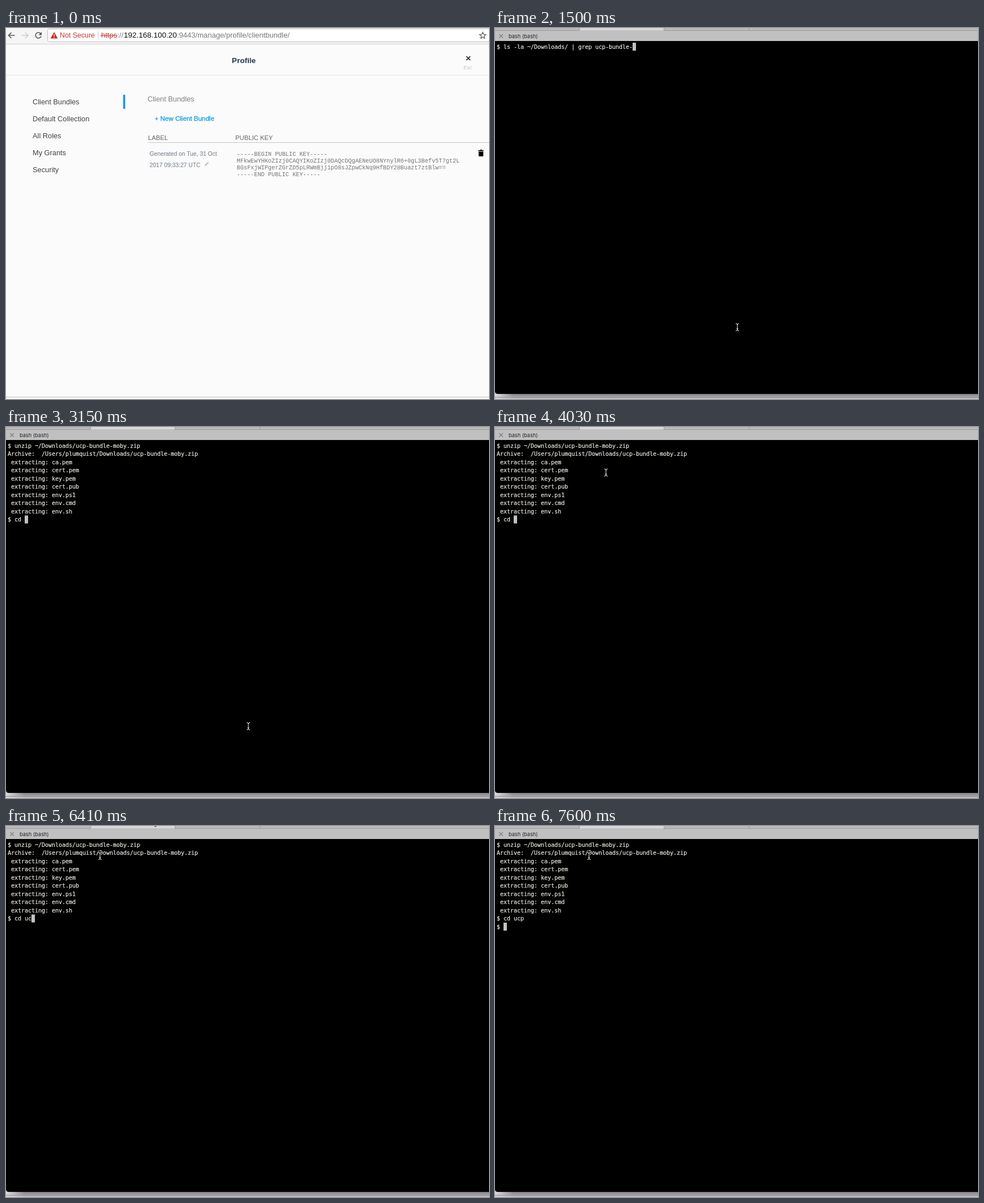
Write an HTML page that moves like this. It is 853 px wide and 656 px high and loops after 8000 ms.

```html
<!DOCTYPE html>
<html lang="en">
<head>
<meta charset="utf-8">
<title>Client bundle</title>
<style>
  html, body { margin: 0; height: 100%; overflow: hidden; background: #fbfbfb; }
  svg { display: block; font-family: "Liberation Sans", Arial, sans-serif; }
  text { white-space: pre; }
  .line { fill: none; stroke: #555; stroke-width: 1.6; }
  .menu { font-size: 12.8px; fill: #444; }
  .head { font-size: 11.25px; fill: #666; }
  .date { font-size: 10.3px; fill: #858f99; stroke: #858f99; stroke-width: .2; }
  .key { font: 10.26px "Liberation Mono", monospace; fill: #757575; }
  .term { font: 10px "DejaVu Sans Mono", monospace; letter-spacing: -.02px; fill: #e9e5dc; stroke: #e9e5dc; stroke-width: .22; }
</style>
</head>
<body>
<svg width="853" height="656" viewBox="0 0 853 656">
  <defs>
    <linearGradient id="shadow" x2="0" y2="1">
      <stop stop-color="#77757a"/><stop offset="1" stop-color="#c6c4c8"/>
    </linearGradient>
    <linearGradient id="corner">
      <stop stop-color="#dddbe0"/><stop offset="1" stop-color="#dddbe0" stop-opacity="0"/>
    </linearGradient>
  </defs>

  <g id="browser">
    <rect width="853" height="656" fill="#fbfbfb"/>
    <rect width="853" height="28" fill="#f5f5f5"/>
    <path d="M0 28.5H853" stroke="#cfcfcf"/>
    <rect x="73.5" y="1.5" width="800" height="23" rx="3" fill="#fff" stroke="#bcbcbc"/>
    <path class="line" d="M15.5 13H5M9.500 8L4.500 13L9.500 18"/>
    <path class="line" style="stroke:#ccc" d="M28 13H38.500M34 8L39 13L34 18"/>
    <path class="line" d="M61.300 10A5 5 0 1 0 62 14.500"/>
    <path d="M63 7V12.500H57.500Z" fill="#555"/>
    <path d="M85 7L91.500 18.500H78.500Z" fill="#c9302c"/>
    <path d="M85 11V14.500M85 15.700V17" stroke="#fff" stroke-width="1.300"/>
    <g font-size="13">
      <text x="95" y="17" font-size="12.400" fill="#c23b33">Not Secure</text>
      <path d="M162.500 6V20" stroke="#c8c8c8"/>
      <text x="168" y="17" fill="#c23b33">https</text>
      <path d="M167 13.500H197" stroke="#c23b33"/>
      <text x="196.500" y="17" fill="#777">://</text>
      <text x="208" y="17" font-size="13.500" fill="#111">192.168.100.20</text>
      <text x="302" y="17" fill="#777">:9443/manage/profile/clientbundle/</text>
    </g>
    <path class="line" style="stroke-width:1.200" d="M842 7.500L843.600 11.300L847.700 11.600L844.500 14.200L845.500 18.200L842 16L838.500 18.200L839.500 14.200L836.300 11.600L840.400 11.300Z"/>

    <text x="420" y="62" text-anchor="middle" font-size="13.600" font-weight="bold" fill="#22384d">Profile</text>
    <path d="M813 50L820 57M820 50L813 57" stroke="#111" stroke-width="1.500"/>
    <text x="808" y="73" font-size="9" fill="#c2c2c2">Esc</text>
    <path d="M0 83.500H853" stroke="#e2e4e6"/>

    <g class="menu">
      <text x="47" y="135">Client Bundles</text>
      <text x="47" y="165">Default Collection</text>
      <text x="47" y="195">All Roles</text>
      <text x="47" y="225">My Grants</text>
      <text x="47" y="255">Security</text>
      <text x="250" y="130" fill="#808080">Client Bundles</text>
    </g>
    <rect x="207" y="118" width="3.500" height="25" fill="#1798e0"/>
    <text x="262.500" y="164" font-size="11.600" fill="#0a9be6" stroke="#0a9be6" stroke-width=".3">+ New Client Bundle</text>
    <text class="head" x="251" y="198">LABEL</text>
    <text class="head" x="405" y="198">PUBLIC KEY</text>
    <path d="M251 202.500H853" stroke="#c6c6c6"/>
    <text class="date" x="253.500" y="226">Generated on Tue, 31 Oct</text>
    <text class="date" x="253.500" y="246">2017 09:33:27 UTC</text>
    <path d="M351.500 243.500L357.500 237.500" stroke="#bbb" stroke-width="2.200"/>
    <g class="key">
      <text x="407.500" y="226">-----BEGIN PUBLIC KEY-----</text>
      <text x="407.500" y="238">MFkwEwYHKoZIzj0CAQYIKoZIzj0DAQcDQgAENeUO8NYnylR6+0gL3Befv5T7gt2L</text>
      <text x="407.500" y="250">BGsFxjWIPgerZGrZD5pLRWmBjj1pO8sJZpwCkNq9HfBDY28Buazt7ztBlw==</text>
      <text x="407.500" y="262">-----END PUBLIC KEY-----</text>
    </g>
    <path d="M834 216H837L838 215H840L841 216H843.500V217.500H834ZM834.700 218.500H843V225.500Q843 227 841.500 227H836.200Q834.700 227 834.700 225.500Z"/>
    <rect y="653" width="853" height="3" fill="#fff"/>
    <path d="M0 652.500H853" stroke="#bdbdbd"/>
  </g>

  <g id="terminal">
    <rect y="640" width="853" height="16" fill="#c6c4c8"/>
    <rect y="646" width="853" height="10" fill="url(#shadow)"/>
    <rect y="640" width="32" height="16" fill="url(#corner)"/>
    <path d="M0 653H853" stroke="#848286"/>
    <path d="M0 20H853V647H5Q0 647 0 642Z"/>
    <rect width="853" height="23" fill="#c0c0c0"/>
    <rect width="853" height="4" fill="#bababa"/>
    <rect x="149" width="149" height="4" fill="#d8d8d8"/>
    <path d="M0 4.500H149M298 4.500H853M149.500 0V4M298.500 0V4M448.500 0V4" stroke="#9b9b9b"/>
    <rect id="tabMark" x="262.500" width="3" height="1.500" fill="#555"/>
    <path d="M7.500 11L14 17.500M14 11L7.500 17.500" stroke="#808080" stroke-width="1.300"/>
    <text x="24" y="18" style="font:9.200px Inter,sans-serif" fill="#222">bash (bash)</text>
    <rect id="caret" width="6" height="14" fill="#c3c1c1"/>
    <g id="rows" class="term"></g>
    <g id="bell" fill="#fff">
      <path d="M694 303a5 5 0 0 1 5 5Q715 312 715 331Q715 347 726 355H662Q673 347 673 331Q673 312 689 308A5 5 0 0 1 694 303Z"/>
      <path d="M685 358H703Q702 367 694 367Q686 367 685 358Z"/>
    </g>
    <g id="pointer" fill="none">
      <path id="beam" d="M-3 -7Q0 -7 0 -4.500Q0 -7 3 -7M0 -5V5M-3 7Q0 7 0 4.500Q0 7 3 7" stroke="#000" stroke-width="2.600"/>
      <use href="#beam" style="stroke:#fff"/>
      <path d="M-3 -6.500Q0 -6.500 0 -4Q0 -6.500 3 -6.500M0 -5V5M-3 6.500Q0 6.500 0 4Q0 6.500 3 6.500M-1.500 2.500H1.500" stroke="#eee"/>
    </g>
  </g>
</svg>
<script>
  const LOOP = 8000, ROW = 14.5, CELL = 6;
  const el = id => document.getElementById(id);

  const unzip = "$ unzip ~/Downloads/ucp-bundle-moby.zip";
  const files = ["ca.pem", "cert.pem", "key.pem", "cert.pub", "env.ps1", "env.cmd", "env.sh"];
  const unpacked = [
    unzip,
    "Archive:  /Users/plumquist/Downloads/ucp-bundle-moby.zip",
    ...files.map(name => " extracting: " + name)
  ];

  // Each track is a list of [start time, value]; values hold until the next one.
  const screen = [
    [0, ["$ "]],
    [1200, ["$ docker stack deploy -c compose.yml demo"]],
    [1500, ["$ ls -la ~/Downloads/ | grep ucp-bundle-"]],
    [1800, [unzip + " "]],
    [2100, [...unpacked, "$ "]],
    [3000, [...unpacked, "$ cd"]],
    [3150, [...unpacked, "$ cd "]],
    [5970, [...unpacked, "$ cd uc"]],
    [7010, [...unpacked, "$ cd ucp"]],
    [7600, [...unpacked, "$ cd ucp", "$ "]]
  ];
  const mouse = [
    [0, [428, 529]], [3440, [590, 455]], [3590, [820, 330]], [3740, [610, 205]],
    [3880, [335, 115]], [4030, [196, 80.5]], [4180, [180, 66]], [4330, [169, 57]],
    [4480, [166, 54]], [4930, [166, 53]]
  ];
  const bell = [[0, 0], [6120, .7], [6260, .3], [6410, 0], [7150, .6], [7300, 0]];

  const at = (track, t) => track.findLast(([start]) => start <= t)[1];
  const show = (id, on) => el(id).style.display = on ? "" : "none";

  const rows = Array.from({ length: 10 + 1 }, (_, i) => {
    const row = document.createElementNS("http://www.w3.org/2000/svg", "text");
    row.setAttribute("x", 3);
    row.setAttribute("y", 36.7 + i * ROW);
    return el("rows").appendChild(row);
  });

  function draw(now) {
    const t = now % LOOP;
    show("browser", t < 300);
    show("terminal", t >= 300);
    show("pointer", t >= 450);
    show("tabMark", t >= 6410 && t < 7600);

    const lines = at(screen, t), last = lines.length - 1;
    rows.forEach((row, i) => {
      const line = lines[i] || "";
      if (row.textContent !== line) row.textContent = line;
    });
    el("caret").setAttribute("x", 3 + lines[last].length * CELL);
    el("caret").setAttribute("y", 26 + last * ROW);
    el("bell").setAttribute("opacity", at(bell, t));
    el("pointer").setAttribute("transform", `translate(${at(mouse, t)})`);
    requestAnimationFrame(draw);
  }
  draw(performance.now());
</script>
</body>
</html>
```
